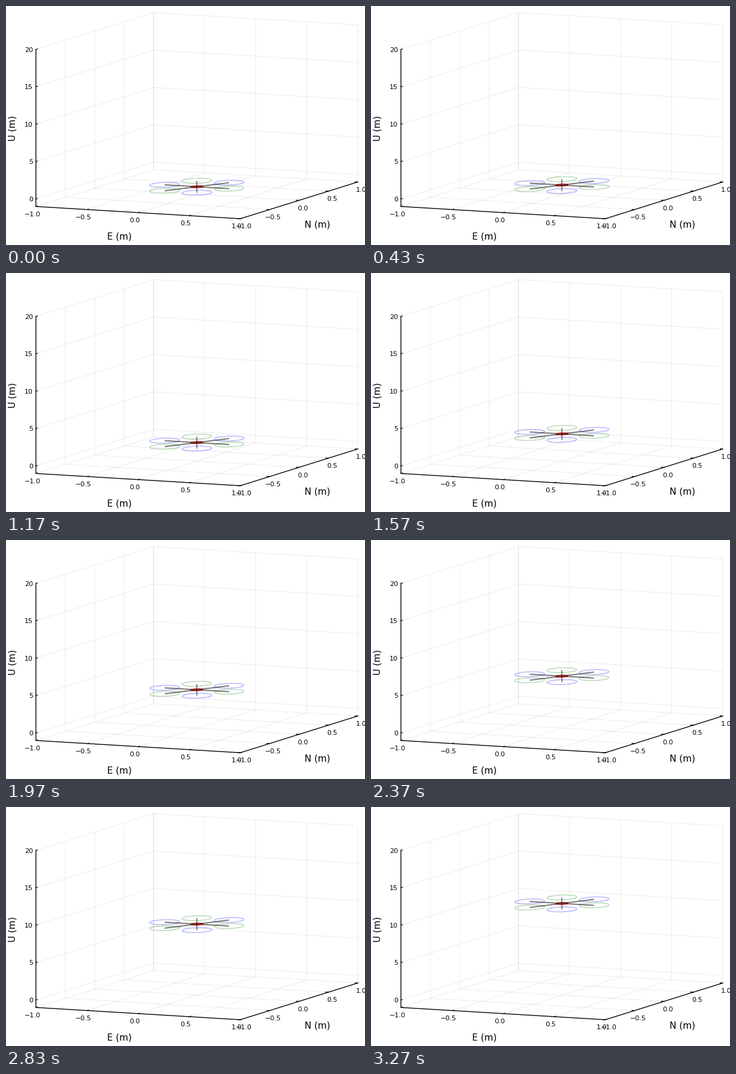
Animation, 600 px wide and 400 px high, one loop 3.31 s. Source, as a matplotlib script:

```python
import numpy as np
import matplotlib.pyplot as plt
from matplotlib.animation import FuncAnimation

W, H, DPI = 600, 400, 100
TICK_MS, LOOP_MS = 10, 3310
STEPS = 99

plt.rcParams["font.family"] = "DejaVu Sans"
fig = plt.figure(figsize=(W / DPI, H / DPI), dpi=DPI, facecolor="white")
ax = fig.add_axes([0, 0, 1, 1])
ax.set(xlim=(0, W), ylim=(H, 0))
ax.axis("off")


def project(e, n, u):
    """Orthographic view of (east, north, up) in stage pixels."""
    x = 319 + 170.75 * e + 98.25 * n
    y = 302.5 + 10.25 * e - 30.75 * n - 12.52 * u
    return x, y


def line(points, width, color="black", alpha=1.0, **kw):
    x, y = project(*np.array(points, float).T)
    return ax.plot(x, y, color=color, alpha=alpha, lw=width * 72 / DPI, **kw)[0]


def label(x, y, text, size=8, **kw):
    ax.text(x, y, text, size=size, va="baseline", **kw)


def number(v):
    return f"{v:.1f}".replace("-", "\u2212")


LOW, HIGH = -1, 20
SIDE = np.linspace(-1, 1, 5)
HEIGHTS = range(0, 21, 5)
TICK = 0.026


def grid(*points):
    line(points, 0.9, alpha=0.085, solid_capstyle="butt")


def draw_box():
    for v in SIDE:
        grid((v, -1, LOW), (v, 1, LOW), (v, 1, HIGH))
        grid((1, v, LOW), (-1, v, LOW), (-1, v, HIGH))
    for u in HEIGHTS:
        grid((-1, -1, u), (-1, 1, u), (1, 1, u))

    line([(-1, -1, HIGH), (-1, -1, LOW), (1, -1, LOW), (1, 1, LOW)], 1.35)
    for v in SIDE:
        line([(v, -1, LOW), (v, -1 + TICK, LOW)], 1.2)
        line([(1, v, LOW), (1 - TICK, v, LOW)], 1.2)
        x, y = project(v, -1, LOW)
        label(x - 6, y + 16.3, number(v), ha="center")
        x, y = project(1, v, LOW)
        label(x + 6, y + 16.3, number(v), ha="center")
    for u in HEIGHTS:
        line([(-1, -1, u), (-1, -1 + TICK, u)], 1.2)
        label(45, project(-1, -1, u)[1] + 4, str(u), ha="right")

    label(189.5, 390.5, "E (m)", 11, ha="center")
    label(520, 370.5, "N (m)", 11, ha="center")
    label(16, 204.5, "U (m)", 11, ha="center", rotation=90,
          rotation_mode="anchor")


ARM, ROTOR, BODY = 0.315, 0.127, 0.052
TURN = np.linspace(0, 2 * np.pi, 73)


def circle(e, n, r):
    return np.column_stack([e + r * np.cos(TURN), n + r * np.sin(TURN), 0 * TURN])


def build_drone():
    parts = [line(circle(0, 0, BODY), 1.3, "red")]
    hubs = [(ARM * np.cos(a), ARM * np.sin(a)) for a in np.arange(6) * np.pi / 3]
    for i, (e, n) in enumerate(hubs):
        color = "blue" if i % 2 else "green"
        parts.append(line(circle(e, n, ROTOR), 1.7, color, 0.25))
    for i, (e, n) in enumerate(hubs[:3]):
        # the third arm is seen as a thin upright line
        width, alpha = (1.3, 0.68) if i == 2 else (2.1, 0.5)
        parts.append(line([(e, n, 0), (-e, -n, 0)], width, alpha=alpha,
                          solid_capstyle="butt"))
    return [(p, p.get_ydata().copy()) for p in parts]


draw_box()
drone = build_drone()


def update(i):
    step = min(STEPS - 1, int((i + 0.5) * 0.3))  # 30 poses per second
    rise = 0.0144 * ((step + 1) ** 2 - 1)        # steady acceleration
    for part, y in drone:
        part.set_ydata(y - rise)
    return [part for part, _ in drone]


anim = FuncAnimation(fig, update, frames=LOOP_MS // TICK_MS, interval=TICK_MS,
                     repeat=True, repeat_delay=0, blit=False)
plt.show()
```
